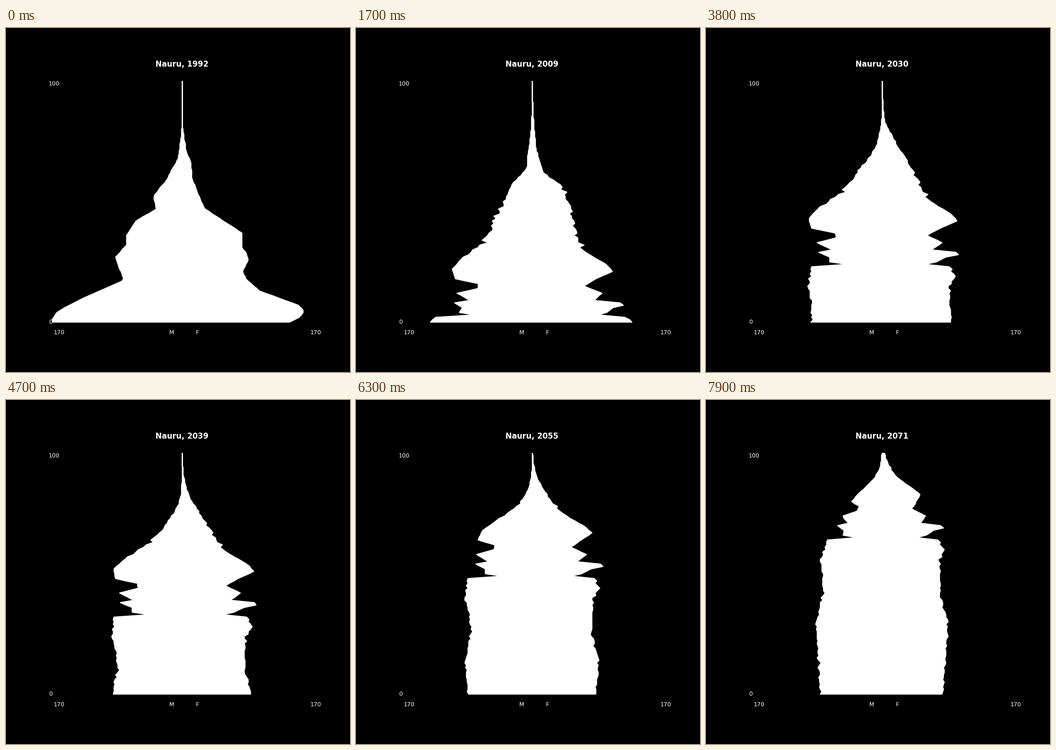
Animation, 748 px wide and 748 px high, one loop 8 s. Source, as a matplotlib script:

```python
import numpy as np
import matplotlib.pyplot as plt
from matplotlib.animation import FuncAnimation
from matplotlib.patches import Polygon

START, CENSUS, FRAMES, STEP = 1992, 2009, 80, 100
LIMIT = 170
AGES = np.arange(101)
BIRTHS = np.arange(START - 100, START + FRAMES)


def curve(x, points):
    return np.interp(x, *zip(*points))


class Sex:
    """People of one sex, counted by age for any year."""

    def __init__(self, seed, life, first, cohorts):
        self.life = life
        self.first = curve(AGES, first)
        rng = np.random.default_rng(seed)
        jitter = np.where(BIRTHS < 1982, 0.04, np.where(BIRTHS < 2008, 0, 0.012))
        self.adults = curve(BIRTHS, cohorts) * (1 + jitter * rng.normal(size=BIRTHS.size))

    def model(self, year):
        """Adults of each cohort, plus children who later emigrate, times survival."""
        born = year - AGES
        adults = np.interp(born, BIRTHS, self.adults)
        leavers = curve(born, [(2009, 45), (2022, 22), (2030, 14), (2042, 3), (2055, 0)])
        life = self.life + np.clip(0.5 * (born - 1972), -8, 15)
        return (adults + leavers * np.exp(-AGES / 10)) * np.exp(-(AGES / life) ** 5)

    def count(self, year):
        if year >= CENSUS:
            return np.round(self.model(year))
        # Carry each cohort from the first profile to the census.
        span = CENSUS - START
        passed = year - START
        begin = np.clip((passed - AGES) / span, 0, None)
        mix = ((passed / span - begin) / (1 - begin)) ** 2.3
        goal = self.model(CENSUS)
        known = np.interp(AGES - passed, AGES, self.first)
        birth = self.first[0] + (goal[0] - self.first[0]) * begin
        old = np.where(AGES >= passed, known, birth)
        new = np.interp(AGES + CENSUS - year, AGES, goal)
        return np.round(old + (new - old) * mix)


male = Sex(
    4, 73,
    first=[(0, 165), (1, 166), (4, 160), (6, 150), (10, 126), (14, 98), (17, 77),
           (18, 75), (25, 83), (27, 85), (32, 71), (36, 71), (42, 59), (47, 33),
           (51, 36), (53, 35), (59, 20), (64, 12), (68, 5), (78, 1), (83, 0)],
    cohorts=[(1892, 26), (1935, 24), (1945, 17), (1951, 42), (1962, 46), (1972, 58),
             (1976, 58), (1980, 81), (1987, 97), (1991, 91), (1993, 60), (1995, 58),
             (1997, 82), (2000, 62), (2001, 79), (2003, 64), (2005, 63), (2006, 41),
             (2007, 86), (2015, 85), (2022, 79), (2030, 77), (2042, 84), (2071, 78)])

female = Sex(
    9, 81,
    first=[(0, 137), (2, 149), (4, 154), (5, 154), (7, 148), (13, 98), (18, 81),
           (21, 77), (26, 84), (29, 81), (31, 76), (37, 76), (47, 29), (50, 24),
           (60, 12), (66, 11), (71, 5), (79, 1), (83, 0)],
    cohorts=[(1892, 11), (1937, 12), (1947, 22), (1952, 48), (1962, 53), (1975, 56),
             (1980, 65), (1985, 90), (1988, 97), (1991, 74), (1994, 56), (1997, 75),
             (2000, 61), (2001, 92), (2002, 94), (2003, 78), (2005, 65), (2006, 51),
             (2007, 81), (2011, 86), (2015, 78), (2022, 75), (2030, 74), (2041, 83),
             (2071, 77)])

plt.rcParams["font.family"] = "DejaVu Sans"
fig = plt.figure(figsize=(7.48, 7.48), dpi=100, facecolor="black")
ax = fig.add_axes([0.125, 0.11, 0.775, 0.77])
ax.set(xlim=(-LIMIT, LIMIT), ylim=(-5, 105))
ax.axis("off")

shape = Polygon(np.zeros((4, 2)), facecolor="white", edgecolor="white",
                linewidth=1.5, joinstyle="round", clip_on=False)
ax.add_patch(shape)
title = ax.text(-0.5, 106.1, "", color="white", size=12, weight="bold", ha="center")


def label(x, y, text, va="baseline"):
    ax.text(x, y, text, color="white", size=9, va=va)


for age in (0, 100):
    label(-LIMIT - 0.3, 0.99 * age, str(age), "center")
label(-164, -5, str(LIMIT))
label(163, -5, str(LIMIT))
label(-17, -5, "M")
label(17, -5, "F")


def update(i):
    year = START + i
    left = np.column_stack([-male.count(year), AGES])
    right = np.column_stack([female.count(year), AGES])
    shape.set_xy(np.vstack([left, right[::-1]]))
    title.set_text(f"Nauru, {year}")
    return shape, title


anim = FuncAnimation(fig, update, frames=FRAMES, interval=STEP,
                     repeat=True, repeat_delay=0)
plt.show()
```
